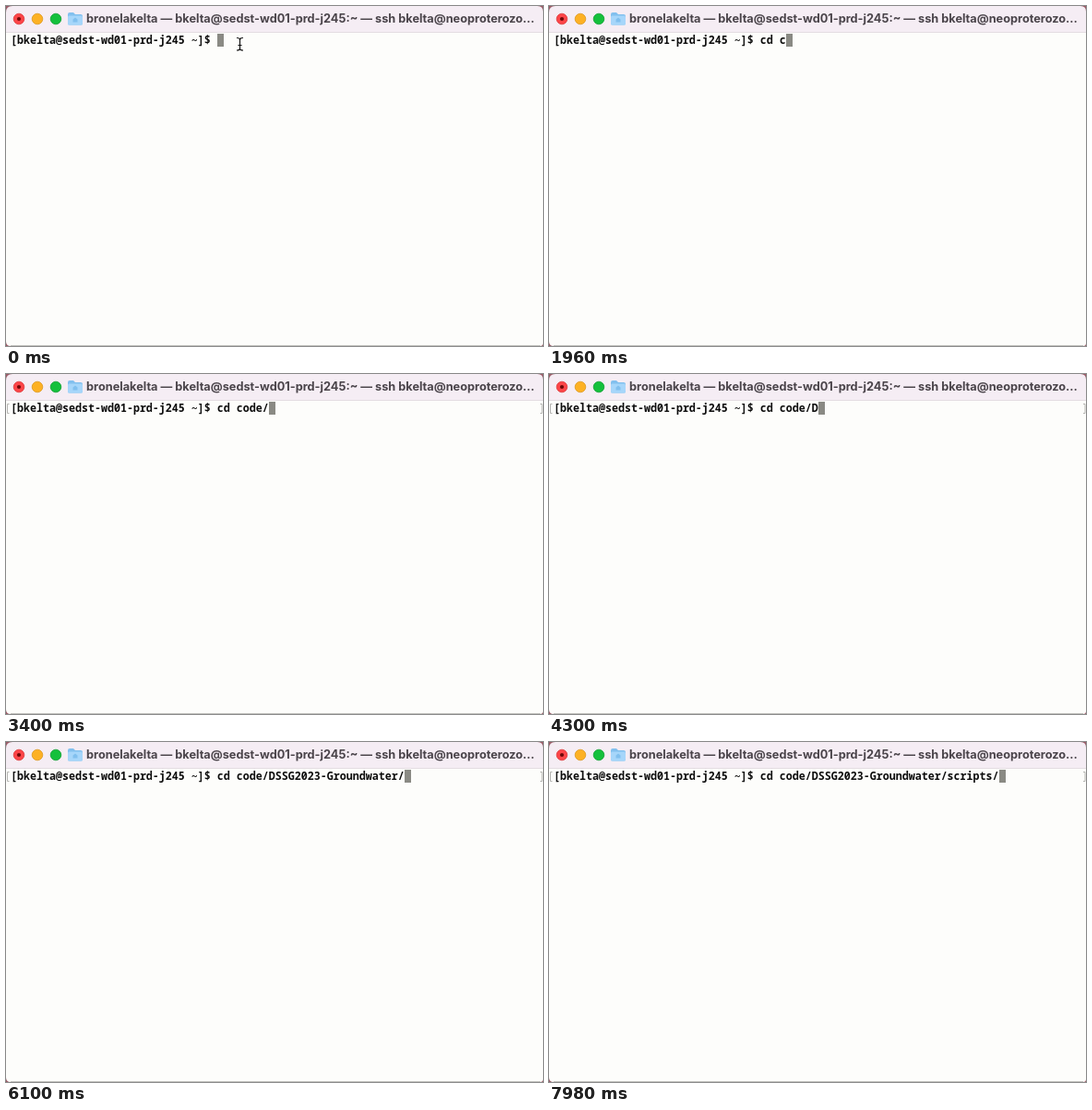
Recreate the animation shown at these times as an HTML page. Size 582x368 px, loop 8 s.

```html
<!DOCTYPE html>
<html lang="en">
<head>
<meta charset="utf-8">
<title>Terminal</title>
<style>
  html, body { margin: 0; width: 100%; height: 100%; overflow: hidden; background: #fdfdfb; }
  svg { display: block; width: 582px; height: 368px; }
  .title { font: 700 12.74px Inter, "Open Sans", sans-serif; fill: #4a444a; }
  .shell { font: 600 11.667px "Noto Sans Mono", "DejaVu Sans Mono", monospace; fill: #0c0c0c; white-space: pre; }
</style>
</head>
<body>
<svg viewBox="0 0 582 368">
  <rect width="582" height="368" fill="#9a5c68"/>
  <path d="M0 28H582V365q0 3-3 3H5q-5 0-5-5Z" fill="#fdfdfb"/>
  <path d="M0 28V7q0-7 7-7H576q6 0 6 6V28Z" fill="#f5edf4"/>
  <path d="M0 28.5H582" stroke="#e4dce2"/>
  <path d="M5 367.5H579" stroke="#c4c4c0"/>

  <g stroke-width=".8">
    <circle cx="14" cy="14" r="5.8" fill="#fc4548" stroke="#dc3a3c"/>
    <circle cx="34" cy="14" r="5.8" fill="#fdb124" stroke="#dc9a20"/>
    <circle cx="54" cy="14" r="5.8" fill="#14c03c" stroke="#12a034"/>
  </g>
  <circle cx="14" cy="14" r="2.1" fill="#6e0808"/>

  <path d="M67 9q0-2 2-2h4l2 2h6q2 0 2 2v8q0 1.5-2 1.5H69q-2 0-2-1.5Z" fill="#82c0ee"/>
  <rect x="67" y="10.5" width="16" height="10" rx="1.5" fill="#a6d6fa"/>
  <path d="M72.5 17.5v-3l2.5-2 2.5 2v3Z" fill="#82c0ee"/>

  <text class="title" x="87" y="18">bronelakelta — bkelta@sedst-wd01-prd-j245:~ — ssh bkelta@neoproterozo…</text>

  <rect id="cursor" y="30" width="7" height="14" fill="#8a8a84"/>
  <text id="line" class="shell" x="5" y="41" xml:space="preserve"></text>
  <path id="marks" d="M3.5 32.5H1.5V42.5H3.5M579 32.5H581V42.5H579" fill="none" stroke="#b4b4b0"/>
  <path id="pointer" d="M250 34.5q3.5 0 3.5 2V46q0 2-3.5 2M257 34.5q-3.5 0-3.5 2M253.5 46q0 2 3.5 2M251.5 42.5h4" fill="none" stroke="#111" stroke-width="1.2"/>
</svg>
<script>
  const LOOP = 8000, LEFT = 5, CELL = 7;
  const PROMPT = "[bkelta@sedst-wd01-prd-j245 ~]$ ";
  const REPO = "cd code/DSSG2023-Groundwater/";
  const FIRST_KEY = 900, FIRST_TAB = 3200;

  // Each entry is the time in ms and the command as it then stands.
  const typing = [
    [0, ""],
    [FIRST_KEY, "c"],
    [1160, "cd"],
    [1420, "cd "],
    [1920, "cd c"],
    [FIRST_TAB, "cd code/"],
    [4260, "cd code/D"],
    [6020, REPO],
    [6960, REPO + "s"],
    [7640, REPO + "scripts/"]
  ];

  const get = id => document.getElementById(id);
  const line = get("line"), cursor = get("cursor"), marks = get("marks"), pointer = get("pointer");
  const show = (el, on) => el.setAttribute("visibility", on ? "visible" : "hidden");

  function draw(t) {
    const command = typing.filter(([at]) => at <= t).pop()[1];
    const text = PROMPT + command;
    if (line.textContent !== text) line.textContent = text;
    cursor.setAttribute("x", LEFT + CELL * text.length);
    show(marks, t >= FIRST_TAB);
    show(pointer, t < FIRST_KEY);
  }

  const start = performance.now();
  function tick() {
    draw((performance.now() - start) % LOOP);
    requestAnimationFrame(tick);
  }
  tick();
</script>
</body>
</html>
```
